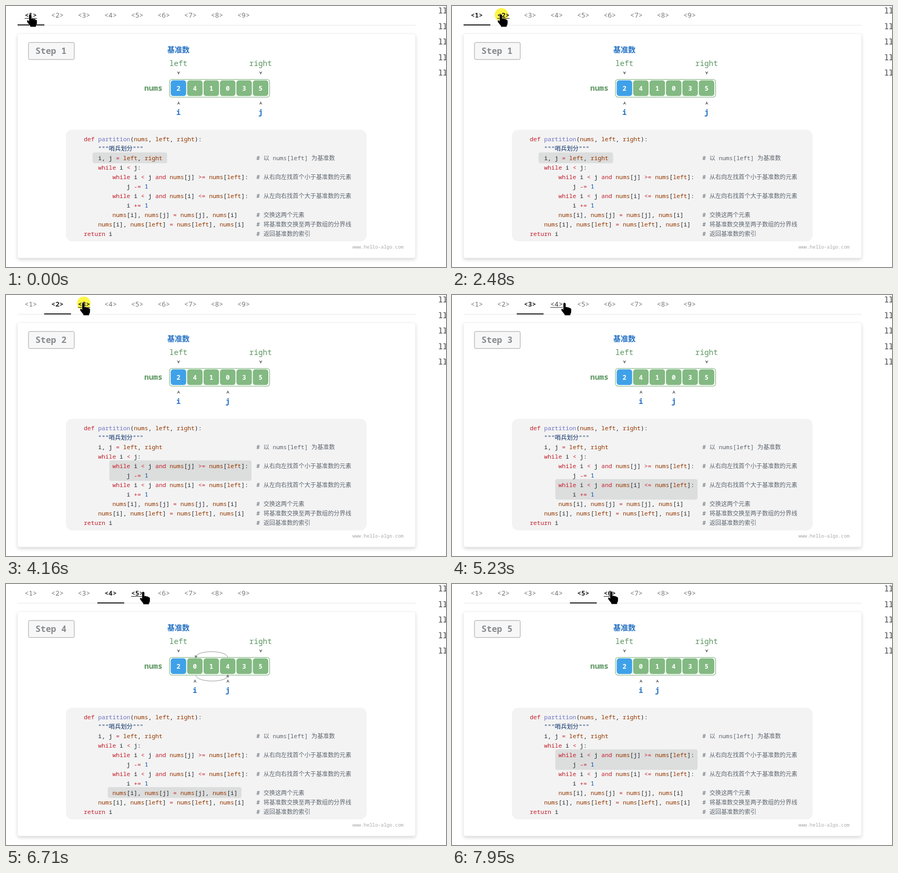
An HTML page for the animation above (8 s loop, 837 by 496 pixels).

```html
<!DOCTYPE html>
<html lang="zh-CN">
<head>
<meta charset="utf-8">
<title>Partition steps</title>
<style>
html, body { margin: 0; width: 100%; height: 100%; overflow: hidden; background: #fff; }
svg { display: block; width: 837px; height: 496px; }
text { font-family: "Noto Sans Mono", "Noto Sans CJK SC", "Noto Sans CJK", monospace; white-space: pre; }
</style>
</head>
<body>
<svg id="stage" viewBox="0 0 837 496" xmlns="http://www.w3.org/2000/svg">
  <defs>
    <filter id="shadow" x="-5%" y="-5%" width="110%" height="112%">
      <feDropShadow dx="0" dy="3" stdDeviation="3" flood-color="#000" flood-opacity=".16"/>
    </filter>
  </defs>
</svg>
<script>
const LOOP = 8000, PITCH = 50.6, CELL = 31.25, CHAR = 6.8;
const INK = "#24292f", GREEN = "#5b9560", BLUE = "#2672c4";
const stage = document.getElementById("stage");

function add(tag, attrs, parent = stage) {
  const el = document.createElementNS("http://www.w3.org/2000/svg", tag);
  for (const k in attrs) el.setAttribute(k, attrs[k]);
  parent.append(el);
  return el;
}
function label(x, y, str, size, fill, weight = 400, anchor = "start", parent = stage) {
  const el = add("text", { x, y, "font-size": size, fill, "font-weight": weight, "text-anchor": anchor }, parent);
  el.textContent = str;
  return el;
}
const box = (x, y, width, height, rx, fill, more) => add("rect", { x, y, width, height, rx, fill, ...more });
const slotX = i => 328 + i * CELL;

// Tab strip
box(22, 36, 757, 1, 0, "#e6e6e6");
const tabs = Array.from({ length: 9 }, (_, k) => {
  const x = 47.2 + k * PITCH;
  return {
    text: label(x, 21.5, `<${k + 1}>`, 13, "#757575", 500, "middle"),
    line: box(x - 11.7, 23, 23.4, 1, 0, INK)
  };
});
const bar = box(22, 35, 51, 2, 0, "#212121");

// Clipped text of the neighbouring column
for (let k = 0; k < 5; k++) label(822.5, 14 + k * 29.6, "ll", 14, "#333");

// Card
box(22, 52.5, 757, 426.5, 4, "#fff", { filter: "url(#shadow)" });
box(22, 52.5, 757, 426.5, 4, "#fff", { stroke: "#ececec", "stroke-width": 0.8 });
box(42.8, 69.3, 87, 32.4, 2.5, "#f7f7f7", { stroke: "#a3a3a3" });
const title = label(56, 90.7, "", 16.4, "#87898c", 700);
label(328, 88, "基准数", 14.2, BLUE, 700, "middle");
label(328, 114, "left", 14.3, GREEN, 400, "middle");
label(484.3, 114, "right", 14.3, GREEN, 400, "middle");
label(263, 160.7, "nums", 14.4, GREEN, 700);

// Array
box(311, 139.5, 190.5, 33.8, 5, "#fff", { stroke: "#7bb07c", "stroke-width": 1.1 });
const cells = Array.from({ length: 6 }, (_, i) => {
  box(slotX(i) - 14.7, 141.3, 29.4, 29.8, 5, i ? "#83b982" : "#3fa1e8");
  return label(slotX(i), 160.5, "", 12.5, "#fff", 600, "middle");
});
const chevron = (parent, place) => add("path", {
  d: "M-2.6,-2.8 L0,2.8 L2.6,-2.8 L0,-.8 Z", fill: "#666", stroke: "#666", "stroke-width": 0.4,
  transform: place
}, parent);
chevron(stage, "translate(328.2 127.2)");
chevron(stage, "translate(484.5 127.2)");
const pointers = ["i", "j"].map(name => {
  const g = add("g", {});
  chevron(g, "translate(.3 184.5) scale(1 -1)");
  label(0, 206.8, name, 14.6, BLUE, 700, "middle", g);
  return g;
});
const arcs = add("g", { fill: "none", stroke: "#8b8f8b", "stroke-width": 0.9 });
add("path", { d: "M422,140 C421,125 362,125 361,139 M361,173 C362,188 421,188 422,174" }, arcs);
add("path", { d: "M359,136 L361,141 L363.6,137 Z M419.4,176.5 L422,172 L424,177 Z", fill: "#777" }, arcs);

// Code
box(114, 235.3, 572, 212, 12, "#f3f3f3");
const mark = box(0, 0, 0, 0, 4, "#dcdddd");
const code = `def partition(nums, left, right):
    """哨兵划分"""
    i, j = left, right#以 nums[left] 为基准数
    while i < j:
        while i < j and nums[j] >= nums[left]:#从右向左找首个小于基准数的元素
            j -= 1
        while i < j and nums[i] <= nums[left]:#从左向右找首个大于基准数的元素
            i += 1
        nums[i], nums[j] = nums[j], nums[i]#交换这两个元素
    nums[i], nums[left] = nums[left], nums[i]#将基准数交换至两子数组的分界线
return i#返回基准数的索引`;
const rules = [
  [/^"/, "#0a3069"],
  [/^(def|while|and|return|[=<>+-]+)$/, "#c4212e"],
  [/^(nums|left|right)$/, "#953800"],
  [/^partition$/, "#6d74c6"],
  [/^\d+$/, "#0550ae"]
];
code.split("\n").forEach((row, n) => {
  const [src, note] = row.split("#");
  const body = src.trimStart(), y = 256.7 + n * 18;
  const line = label(148 + (src.length - body.length) * CHAR, y, "", CHAR / 0.6, INK, 500);
  for (const word of body.match(/"""[^"]*"""|\w+|[=<>+-]+|[^\w=<>+"-]+/g)) {
    const rule = rules.find(r => r[0].test(word));
    add("tspan", { fill: rule ? rule[1] : INK }, line).textContent = word;
  }
  if (note) label(476.3, y, "# " + note, 11.15, "#5d666f", 500);
});
label(659, 461, "www.hello-algo.com", 9, "#a9a9a9");

// Click halo and hand
const halo = add("circle", { r: 12.8, fill: "#fdf544", style: "mix-blend-mode:multiply" });
const hand = add("path", {
  d: "M-2.4,1.8 Q-2.2,-.6 0,-.6 Q2.3,-.6 2.5,2 V8 Q5,6.6 6.4,8.6 Q9,7.6 10,9.8 Q12.8,9.2 13,12.3 V17 Q12.8,20 11.2,21.5 V23.8 H0 V22 L-5.8,14.6 Q-7,11.4 -4.6,11 Q-3.4,11.2 -2.4,12.8 Z",
  fill: "#000", stroke: "#fff", "stroke-width": 0.5
});

// Steps: start time, values, i, j, highlight [x, y, w, h]
const loopMark = y => [196.5, y, 270.5, 39];
const steps = [
  { at: 0, nums: "241035", i: 0, j: 5, mark: [164.5, 278.3, 142, 20.5] },
  { at: 2610, nums: "241035", i: 0, j: 3, mark: loopMark(314.2) },
  { at: 4290, nums: "241035", i: 1, j: 3, mark: loopMark(349.7) },
  { at: 6020, nums: "201435", i: 1, j: 3, mark: [193.5, 386, 254.5, 20.5] },
  { at: 7350, nums: "201435", i: 1, j: 2, mark: loopMark(314.2) }
];
const PRESS = 130;

// Pointer path: time, x, y
const path = [
  [0, 46, 16], [60, 46, 16], [290, 338, 15], [530, 93, 16],
  [2950, 93, 16], [3340, 147, 15], [4930, 147, 15], [5225, 214, 15],
  [5480, 214, 15], [5800, 207, 15.5], [6080, 207, 15.5], [6290, 257, 15],
  [6320, 257, 15], [6680, 261, 15], [7520, 261, 15], [7840, 302, 14.5], [7940, 303, 14.5]
];
const clamp = v => Math.min(1, Math.max(0, v));
const ease = v => v * v * (3 - 2 * v);

function tipAt(t) {
  let k = 0;
  while (k < path.length - 2 && path[k + 1][0] <= t) k++;
  const [a, b] = [path[k], path[k + 1]];
  const p = ease(clamp((t - a[0]) / (b[0] - a[0])));
  return [a[1] + (b[1] - a[1]) * p, a[2] + (b[2] - a[2]) * p];
}
const stepAt = t => Math.max(0, steps.filter(s => s.at <= t).length - 1);
const hoverAt = t => Math.floor((tipAt(t)[0] - 22) / PITCH);

// Share of the last 250 ms in which a tab was lit
function glow(k, t) {
  let sum = 0;
  for (let d = 0; d < 250; d += 25) {
    const u = Math.max(0, t - d);
    if (hoverAt(u) === k || stepAt(u) === k) sum++;
  }
  return sum / 10;
}

function render(t) {
  const n = stepAt(t), step = steps[n], [x, y] = tipAt(t), hover = hoverAt(t);

  tabs.forEach((tab, k) => {
    const lit = glow(k, t), v = Math.round(117 - 84 * lit);
    tab.text.setAttribute("fill", `rgb(${v},${v},${v})`);
    tab.text.setAttribute("font-weight", lit > 0.7 ? 600 : 500);
    tab.line.setAttribute("fill", `rgb(${v},${v},${v})`);
    tab.line.setAttribute("visibility", k === hover ? "visible" : "hidden");
  });
  const slide = n ? ease(clamp((t - step.at) / 250)) - 1 : 0;
  bar.setAttribute("x", 22 + (n + slide) * PITCH);

  title.textContent = "Step " + (n + 1);
  cells.forEach((c, i) => {
    c.textContent = step.nums[i];
    c.setAttribute("font-weight", n && i && (i === step.i || i === step.j) ? 800 : 600);
  });
  pointers.forEach((g, k) => g.setAttribute("transform", `translate(${slotX(k ? step.j : step.i)} 0)`));
  arcs.setAttribute("visibility", n === 3 ? "visible" : "hidden");
  ["x", "y", "width", "height"].forEach((name, k) => mark.setAttribute(name, step.mark[k]));

  let press = 0;
  for (const s of steps.slice(1))
    if (t >= s.at - PRESS) press = 1 - clamp((t - s.at) / 130);
  halo.setAttribute("cx", x + 1);
  halo.setAttribute("cy", y + 0.7);
  halo.setAttribute("opacity", press);
  hand.setAttribute("transform", `translate(${x} ${y})`);
}

function tick() {
  render(performance.now() % LOOP);
  requestAnimationFrame(tick);
}
tick();
</script>
</body>
</html>
```
